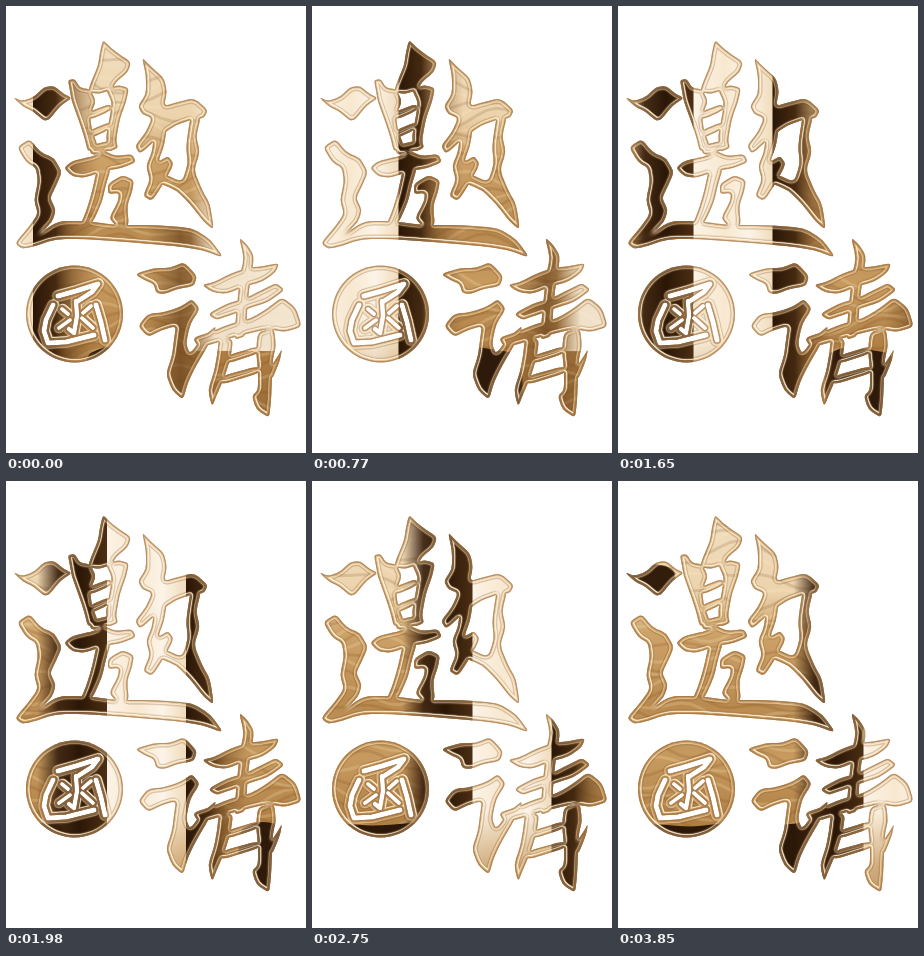
Animation of 300 by 447 pixels, one loop 3.96 s. Source, as an HTML page with a canvas:

```html
<!DOCTYPE html>
<html lang="zh">
<head>
<meta charset="utf-8">
<title>邀请函</title>
<style>
html, body { margin: 0; width: 100%; height: 100%; overflow: hidden; background: #fff; }
canvas { display: block; }
</style>
</head>
<body>
<canvas id="stage" width="300" height="447"></canvas>
<script>
const W = 300, H = 447, STEP = 110, STEPS = 36, SPEED = 8.5, LEFT = 305, TEX_W = 610;

// Brush strokes as closed outlines; corners are softened when drawn.
const STROKES = [
  // 邀
  '7,91 16,95 28,91 38,81 48,80 58,88 66,92 54,100 44,113 38,115 28,106 16,100',
  '62,74 69,73 74,82 84,83 90,95 84,110 86,125 92,140 82,146 78,130 72,112 66,96 64,85',
  '97,34 103,40 110,46 125,56 122,66 110,76 106,84 92,88 82,86 85,76 92,60 94,46',
  '100,84 112,79 123,82 120,96 114,112 110,134 112,142 102,146 100,130 104,110 106,96',
  '82,106 104,98 106,104 84,114',
  '84,124 104,116 104,123 86,132',
  '82,140 106,134 111,142 86,150',
  '58,162 66,155 88,150 98,145 110,150 126,148 130,156 116,162 98,165 78,172 66,170',
  '92,158 105,162 100,178 96,196 86,218 72,224 80,206 86,186',
  '102,178 116,169 128,174 126,186 121,200 123,220 112,222 103,212 112,196 113,187 102,188',
  '136,51 144,60 158,72 161,86 158,100 172,96 188,92 202,104 198,112 184,114 168,120 152,132 134,148 129,140 140,126 146,112 136,108 132,100 140,88 140,70',
  '148,128 161,121 158,140 152,156 162,150 168,158 156,180 146,195 137,190 144,174 140,160 146,146',
  '185,107 195,111 190,130 194,146 188,164 196,184 204,198 208,224 198,216 184,198 170,184 150,176 158,168 176,176 182,158 180,140',
  '11,141 24,133 34,146 48,152 56,166 50,180 44,192 50,204 46,216 34,228 16,243 9,237 22,222 32,208 28,194 32,176 30,162 20,156',
  '14,243 30,230 52,215 80,215 110,219 150,219 186,222 204,233 218,252 196,244 170,240 120,236 80,233 50,233 26,241',
  // 请
  '129,268 148,262 164,262 178,256 191,270 188,280 172,283 158,288 150,287 148,278 138,274',
  '132,320 142,308 160,306 176,300 186,293 194,303 184,318 180,338 184,348 196,332 211,319 204,336 190,360 182,376 177,394 166,384 160,368 166,350 168,334 170,320 156,324 142,331',
  '233,231 242,240 248,250 246,266 243,284 241,306 240,330 228,334 230,310 232,290 234,270 238,252',
  '196,279 208,276 224,268 240,262 258,260 273,257 270,266 256,276 240,280 220,288 206,286',
  '202,308 220,298 240,292 256,284 270,277 279,284 262,296 244,302 222,310 210,314',
  '187,332 204,326 224,318 246,312 262,302 276,291 290,302 296,321 278,326 262,323 244,327 222,333 204,339 192,341',
  '213,332 227,333 225,350 219,370 212,386 206,401 202,384 208,366 211,350',
  '252,326 268,322 270,340 267,352 266,372 265,396 263,412 250,403 246,390 252,384 252,364 250,344',
  '264,362 272,350 276,343 274,354 266,374',
  '220,350 252,340 254,347 220,358',
  '216,370 252,360 254,367 214,379'
];

// White strokes of 函 inside the disc: width, then points.
const CUTS = [
  [5, '52,290 70,285 92,278 86,286 72,295'],
  [5, '47,299 40,314 38,325 42,337 60,336 88,329'],
  [5, '90,299 95,316 99,334'],
  [4.5, '70,295 71,310 68,327 63,323'],
  [4, '56,303 62,308'],
  [4, '53,322 64,314'],
  [4, '77,307 85,300'],
  [4, '76,312 87,322']
];

const points = s => s.split(' ').map(p => p.split(',').map(Number));
const mix = (a, b, k) => [a[0] + (b[0] - a[0]) * k, a[1] + (b[1] - a[1]) * k];

function layer(w = W) {
  const c = document.createElement('canvas');
  c.width = w;
  c.height = H;
  return c.getContext('2d');
}

function outline(g, pts) {
  const n = pts.length;
  g.beginPath();
  pts.forEach((p, i) => {
    g.lineTo(...mix(p, pts[(i + n - 1) % n], .32));
    g.quadraticCurveTo(...p, ...mix(p, pts[(i + 1) % n], .32));
  });
  g.closePath();
}

function makeMask() {
  const g = layer();
  for (const s of STROKES) {
    outline(g, points(s));
    g.fill();
  }
  g.beginPath();
  g.arc(68.5, 308, 48.5, 0, 7);
  g.fill();
  g.globalCompositeOperation = 'destination-out';
  g.lineCap = g.lineJoin = 'round';
  for (const [width, s] of CUTS) {
    g.lineWidth = width;
    g.beginPath();
    points(s).forEach(p => g.lineTo(...p));
    g.stroke();
  }
  return g.canvas;
}

function erode(mask, r) {
  const g = layer();
  g.drawImage(mask, 0, 0);
  g.globalCompositeOperation = 'destination-in';
  for (let i = 0; i < 12; i++) {
    const a = i * Math.PI / 6;
    g.drawImage(mask, r * Math.cos(a), r * Math.sin(a));
  }
  return g.canvas;
}

function rim(outer, inner, color, dx = 0, dy = 0) {
  const g = layer();
  g.drawImage(outer, 0, 0);
  g.globalCompositeOperation = 'destination-out';
  g.drawImage(inner, dx, dy);
  g.globalCompositeOperation = 'source-in';
  g.fillStyle = color;
  g.fillRect(0, 0, W, H);
  return g.canvas;
}

function makeBevel(mask) {
  const g = layer();
  const [e1, e2, e3, e4] = [1, 2.2, 3.2, 4.4].map(r => erode(mask, r));
  g.drawImage(rim(mask, e2, 'rgba(214,172,118,.45)'), 0, 0);
  g.drawImage(rim(mask, e1, 'rgba(150,104,58,.6)'), 0, 0);
  g.drawImage(rim(e3, e4, 'rgba(120,76,30,.35)'), 0, 0);
  g.drawImage(rim(e2, e3, 'rgba(255,232,188,.6)'), 0, 0);
  g.drawImage(rim(e2, e2, 'rgba(255,246,222,.85)', 1, -1), 0, 0);
  return g.canvas;
}

// Polished gold sheet; u = 0 lies on the left edge of the stage at the start.
function makeGold() {
  const g = layer(TEX_W);
  g.translate(LEFT, 0);
  const band = (u, y, w, h, stops, down) => {
    const f = g.createLinearGradient(u, y, down ? u : u + w, down ? y + h : y);
    for (const [k, c] of stops) f.addColorStop(k, c);
    g.fillStyle = f;
    g.fillRect(u, y, w, h);
  };
  const shape = (color, s) => {
    g.fillStyle = color;
    outline(g, points(s));
    g.fill();
  };

  band(-LEFT, 0, TEX_W, H, [[0, '#f3e2c8'], [.25, '#ecd3ac'], [.34, '#cda268'],
    [.5, '#b98b50'], [.62, '#c79b60'], [.76, '#b08045'], [1, '#8d6030']], true);

  // soft grain
  g.lineWidth = 3;
  for (let i = 0; i < 44; i++) {
    g.strokeStyle = i % 2 ? 'rgba(110,66,22,.16)' : 'rgba(255,232,190,.2)';
    g.beginPath();
    for (let u = -LEFT; u <= LEFT; u += 10) {
      g.lineTo(u, i * 10.5 + 9 * Math.sin(u / 31 + i * .6) + 5 * Math.sin(u / 13 - i));
    }
    g.stroke();
  }

  shape('#321c0b', '-305,92 -262,82 -240,88 -241,118 -305,120');
  shape('#2c1808', '-320,347 -260,343 -225,346 -190,342 -150,345 -90,340 -90,460 -320,460');
  shape('#2e1a0a', '78,350 100,340 125,344 150,348 154,460 84,460');

  band(140, 215, 68, 232, [[0, 'rgba(110,70,30,0)'], [.5, 'rgba(100,62,26,.65)'], [1, 'rgba(110,70,30,.2)']]);
  band(185, 0, 120, 345, [[0, 'rgba(251,240,222,0)'], [.2, 'rgba(251,240,222,.85)'], [1, 'rgba(251,240,222,.9)']]);

  band(-122, 0, 70, H, [[0, 'rgba(60,34,14,0)'], [.3, 'rgba(56,32,14,.92)'], [.6, '#2b1707'], [1, '#4b2e14']]);
  band(-52, 0, 79, H, [[0, '#fcf3e6'], [.4, '#f8e8d0'], [.7, '#fcf4e8'], [1, '#f1dcbc']]);
  band(-52, 330, 79, 117, [[0, 'rgba(190,142,80,0)'], [.5, 'rgba(190,142,80,.7)'], [1, 'rgba(150,100,50,.8)']], true);
  band(27, 0, 65, H, [[0, '#2a1607'], [.35, '#452a11'], [.62, 'rgba(120,80,38,.6)'], [1, 'rgba(150,104,56,0)']]);
  return g.canvas;
}

const mask = makeMask(), bevel = makeBevel(mask), gold = makeGold();
const ctx = document.getElementById('stage').getContext('2d');

function draw(now) {
  const n = Math.floor(now / STEP) % STEPS;
  ctx.globalCompositeOperation = 'copy';
  ctx.drawImage(mask, 0, 0);
  ctx.globalCompositeOperation = 'source-in';
  ctx.drawImage(gold, n * SPEED - LEFT, 0);
  ctx.globalCompositeOperation = 'source-over';
  ctx.drawImage(bevel, 0, 0);
}

const start = performance.now();
function tick() {
  draw(performance.now() - start);
  requestAnimationFrame(tick);
}
tick();
</script>
</body>
</html>
```
